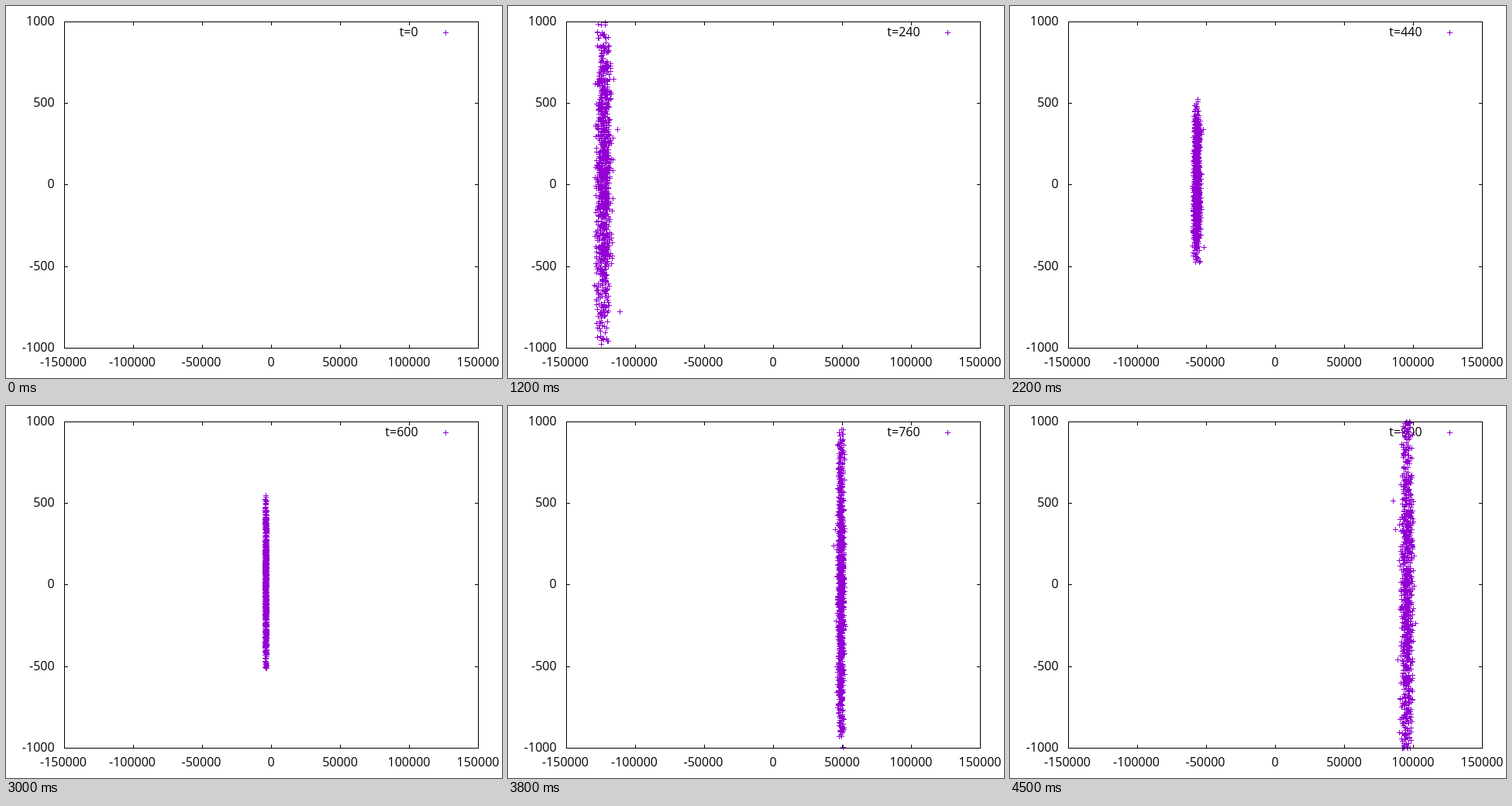
An HTML page with a canvas that plays this animation: 640 px wide and 480 px high, repeating every 4.6 s.

```html
<!DOCTYPE html>
<html lang="en">
<head>
<meta charset="utf-8">
<title>Particle bunch</title>
<style>
  html, body { margin: 0; width: 100%; height: 100%; overflow: hidden; background: #fff; }
  canvas { display: block; }
</style>
</head>
<body>
<canvas id="plot" width="640" height="480"></canvas>
<script>
const ctx = document.getElementById('plot').getContext('2d');
const LEFT = 75, RIGHT = 609, TOP = 20, BOTTOM = 441;
const STEP_MS = 100, STEPS = 46, TIME_STEP = 20;
const FOCUS_X = 603, FOCUS_Y = 512;
const PURPLE = '#9400d3';

let seed = 20417;
function random() {
  seed = (seed * 1664525 + 1013904223) % 4294967296;
  return seed / 4294967296;
}

// Each particle drifts in a straight line: offset and rate about the two foci.
function makeParticle() {
  const r = Math.sqrt(1 - Math.sqrt(random())), a = random() * 2 * Math.PI;
  const bell = random() + random() + random() + random() - 2;
  return {
    dx: (random() - 0.5) * 2,
    u: bell * 0.021,
    y: 453 * r * Math.cos(a),
    v: 3.85 * r * Math.sin(a)
  };
}

const particles = Array.from({ length: 998 }, makeParticle);
particles.push(
  { dx: -0.46, u: -0.0577, y: -243, v: 1.955 },
  { dx: 0, u: -0.048, y: 340, v: 0 }
);

function plus(x, y) {
  ctx.fillRect(x - 3, y, 7, 1);
  ctx.fillRect(x, y - 3, 1, 7);
}

function label(text, x, y, align) {
  ctx.textAlign = align;
  ctx.fillText(text, x, y);
}

function drawLabels(t) {
  ctx.fillStyle = '#000';
  ctx.font = '16px "Open Sans", "Noto Sans", sans-serif';
  for (let i = 0; i <= 6; i++) {
    const value = (i - 3) * 50000;
    label(value, LEFT + 89 * i - (value < 0 ? 1 : 0), 465, 'center');
  }
  for (let i = 0; i <= 4; i++) label(1000 - 500 * i, 62.6, tickY(i) + 5, 'right');
  label('t=' + t, 531.6, 39, 'right');
}

function tickY(i) {
  return Math.round(TOP + 105.24 * i);
}

function drawParticles(t) {
  ctx.fillStyle = PURPLE;
  plus(567, 34);
  const center = 335 + 0.5886 * (t - 600);
  for (const p of particles) {
    const x = Math.round(center + p.dx + p.u * (t - FOCUS_X));
    const y = Math.round(230.5 - 0.2105 * (p.y + p.v * (t - FOCUS_Y)));
    if (x >= LEFT && x <= RIGHT && y >= TOP && y <= BOTTOM) plus(x, y);
  }
}

function drawFrame() {
  ctx.fillStyle = '#000';
  const w = RIGHT - LEFT + 1, h = BOTTOM - TOP + 1;
  for (const y of [TOP, BOTTOM]) ctx.fillRect(LEFT, y, w, 1);
  for (const x of [LEFT, RIGHT]) ctx.fillRect(x, TOP, 1, h);
  for (let i = 1; i < 6; i++) {
    const x = LEFT + 89 * i;
    ctx.fillRect(x, TOP, 1, 5);
    ctx.fillRect(x, BOTTOM - 4, 1, 5);
  }
  for (let i = 1; i < 4; i++) {
    const y = tickY(i);
    ctx.fillRect(LEFT, y, 5, 1);
    ctx.fillRect(RIGHT - 4, y, 5, 1);
  }
}

function draw(step) {
  const t = step * TIME_STEP;
  ctx.fillStyle = '#fff';
  ctx.fillRect(0, 0, 640, 480);
  drawLabels(t);
  drawParticles(t);
  drawFrame();
}

const start = performance.now();
let shown = -1;
function tick() {
  const step = Math.floor((performance.now() - start) / STEP_MS) % STEPS;
  if (step !== shown) draw(shown = step);
  requestAnimationFrame(tick);
}
tick();
</script>
</body>
</html>
```
